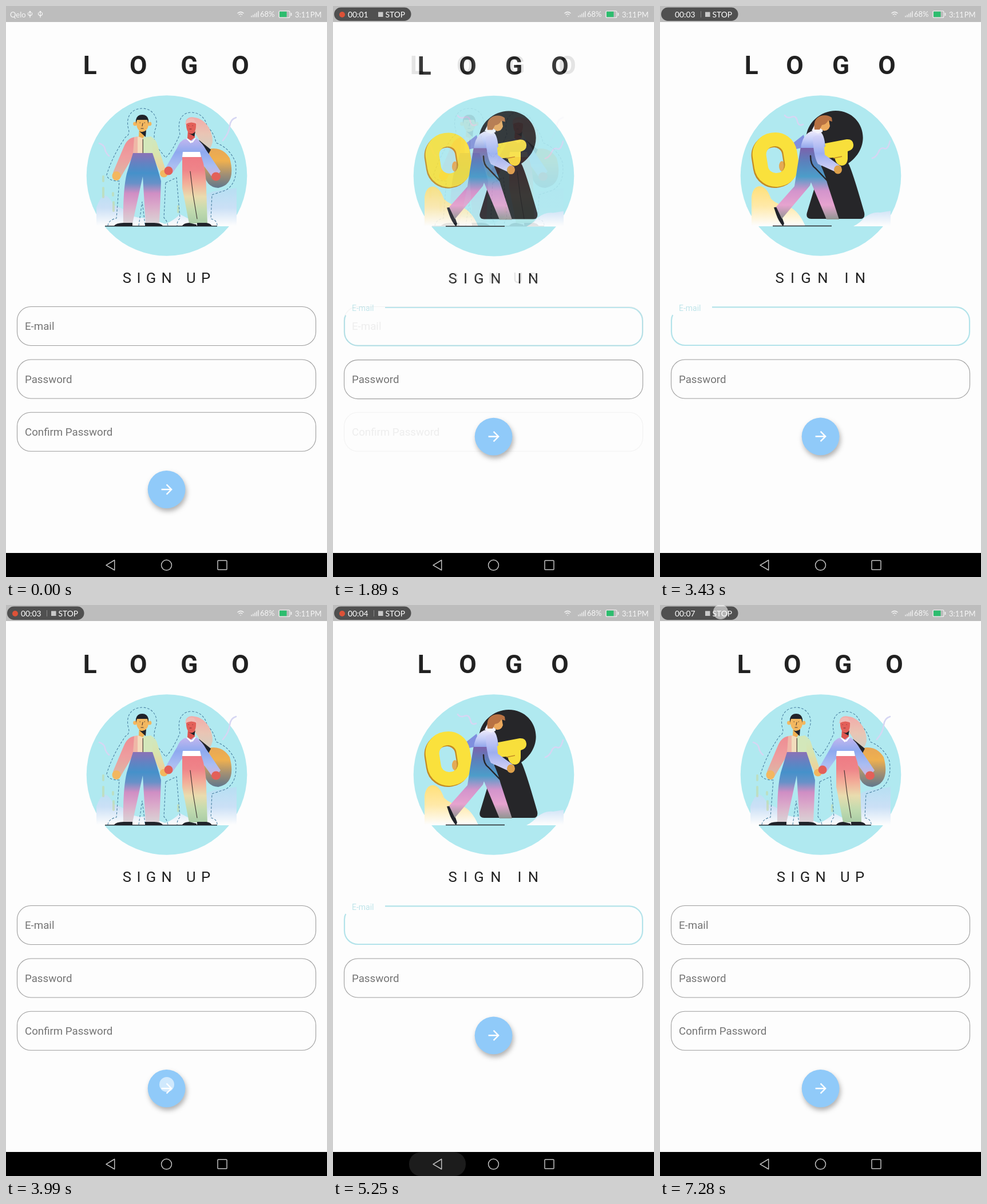
Recreate the animation shown at these times as an HTML page. Size 561 px wide and 998 px high, loop 7.35 s.

```html
<!DOCTYPE html>
<html lang="en">
<head>
<meta charset="utf-8">
<title>Sign up and sign in</title>
<style>
  html, body { margin: 0; width: 100%; height: 100%; overflow: hidden; background: #fdfdfd; }
  svg { display: block; }
  text { font-family: Roboto, sans-serif; white-space: pre; }
  .logo { font-size: 44.2px; font-weight: 700; fill: #212121; }
  .title { font-size: 25.7px; fill: #212121; }
  .label { font-size: 18.7px; fill: #747474; }
  .box { fill: none; stroke: #9c9c9c; stroke-width: 1.1; }
  .bar text { font-family: Lato, sans-serif; font-size: 13px; fill: #f6f6f6; word-spacing: -2.5px; }
  .pill text { font-size: 13.8px; fill: #fff; }
  .line { fill: none; stroke-linecap: round; stroke-linejoin: round; }
  .dash { fill: none; stroke: #4b82a3; stroke-width: 1.1; stroke-dasharray: 4 2.6; }
  #fab { filter: drop-shadow(2px 5px 4px rgba(0, 0, 0, .3)); }
</style>
</head>
<body>
<svg width="561" height="998" viewBox="0 0 561 998">
  <defs id="defs"></defs>

  <g id="signUp">
    <rect width="561" height="998" fill="#fdfdfd"/>
    <text class="logo" x="134.7" y="119" letter-spacing="58.8">LOGO</text>
    <circle cx="281" cy="296.5" r="140.3" fill="#b0e9f0"/>
    <!-- scenery -->
    <path d="M158 385V352Q166 331 173 331Q181 333 188 348Q204 352 213 362Q226 372 244 370Q262 374 278 381Q292 376 304 364L345 385Z" fill="url(#mist)"/>
    <path d="M345 385V332L362 324L403 318V385Z" fill="url(#mist)"/>
    <g class="line" stroke="#c5d9a6" stroke-width="4" opacity=".6">
      <path d="M170 298V306M170 318V334M187 327V331M188 343V358M301 350V360"/>
    </g>
    <g class="line" stroke="#d6d6f3" stroke-width="2.6">
      <path d="M163 240Q172 243 173 250T180 262M379 235Q390 222 391 210T402 195"/>
    </g>
    <g class="dash">
      <path d="M178 384Q179 374 193 371L198 306Q178 306 176 295Q186 262 209 229Q217 225 214 215C208 192 221 179 238 179C256 179 267 195 262 212Q256 228 262 244L279 265Q291 254 304 224C298 198 309 186 324 186C340 186 350 199 351 210Q364 222 367 239Q391 248 401 273Q406 309 384 322L360 330L358 372Q369 374 369 384"/>
      <path d="M232 384L238 342L243 382M279 309L276 370Q282 376 283 384M279 309L298 300L304 371Q299 375 299 384"/>
    </g>
    <!-- man -->
    <path d="M225 229Q212 231 206 246L187 291L200 300L222 263Z" fill="url(#sleeve)"/>
    <path d="M251 228Q262 231 265 244L279 286L270 291L254 260Z" fill="url(#mint)"/>
    <path d="M224 229L239 227V259H222Z" fill="#efb7a7"/>
    <path d="M230 228L239 231V258H230Z" fill="#f2dcbc"/>
    <path d="M239 230L254 228L257 259H239Z" fill="#d3e7ba"/>
    <path d="M233 212H244V225L239 231L232 228Z" fill="#f0b052"/>
    <path d="M233 219Q239 222 245 217L244 229Z" fill="#20232a"/>
    <g fill="#f3b75f">
      <circle cx="225.5" cy="206" r="3.4"/><circle cx="251" cy="206" r="3.4"/>
      <path d="M228 198H249V207Q248 219 238 219Q229 218 228 207Z"/>
      <ellipse cx="193" cy="297" rx="7.5" ry="8"/><ellipse cx="276" cy="293" rx="7" ry="6.5"/>
    </g>
    <path d="M227 206V199Q229 190 238 190Q247 190 249 199V206L247 199H229Z" fill="#20232a"/>
    <path class="line" d="M234 204h.5M242 204h.5M239 205L238 210M236 214H240M239.3 233V257" stroke="#4a3a33" stroke-width="1.2"/>
    <path d="M222 257H256Q265 283 271 306L268 380H244L239 298L221 380H205Q204 322 211 293Z" fill="url(#jeans)"/>
    <!-- woman -->
    <path d="M354 250Q378 245 391 266Q403 312 371 318Q348 317 345 286Z" fill="url(#bag)"/>
    <path d="M314 202Q317 192 330 195C348 197 362 218 361 238Q358 251 350 254L333 226Z" fill="url(#hair)"/>
    <path d="M337 234L358 251L354 259L343 250Z" fill="#20232a"/>
    <path d="M314 232Q304 235 299 248L279 283L290 293L309 267Z" fill="url(#sweater)"/>
    <path d="M333 232Q343 239 350 252L375 289L363 303L339 270Z" fill="url(#sweater)"/>
    <path d="M311 233L335 232L340 260H309Z" fill="url(#sweater)"/>
    <path d="M316 232L323 239L331 231L326 238Z" fill="#fff" stroke="#fff" stroke-width="1.4"/>
    <path d="M318 218H330V230L323 235L317 231Z" fill="#dd5650"/>
    <path d="M319 222Q326 226 331 219L329 228Z" fill="#20232a"/>
    <g fill="#e36059">
      <path d="M315 203Q324 200 332 205Q333 223 323 223Q314 221 315 203Z"/>
      <ellipse cx="284" cy="288" rx="7.5" ry="7.5"/><ellipse cx="367" cy="298" rx="8" ry="7.5"/>
    </g>
    <path d="M313 207Q315 194 328 197L335 207Q324 200 313 207Z" fill="#f1b9b4"/>
    <path class="line" d="M319 209h.4M326 209h.4M321 215H324" stroke="#7a3034" stroke-width="1.1"/>
    <path d="M308 262H341Q350 287 350 318L352 380H320L308 318Z" fill="url(#slacks)"/>
    <path d="M309 255H339L341 264H308Z" fill="#fff"/>
    <path class="line" d="M322 289L327 330L334 372" stroke="#3b3330" stroke-width="1.1"/>
    <!-- shoes and ground -->
    <g fill="#20232a">
      <path d="M188 385Q192 379 205 379H221V385ZM243 379H259Q271 379 275 385H243ZM307 385Q311 379 320 379L333 382V385ZM334 385V379H350Q358 380 360 385Z"/>
      <rect x="173" y="384" width="196" height="1.4"/>
    </g>
    <text class="title" x="203.8" y="484" letter-spacing="9.35">SIGN UP</text>
    <g id="upFields"></g>
  </g>

  <g id="signIn">
    <rect width="561" height="998" fill="#fdfdfd"/>
    <text class="logo" x="147.7" y="119" letter-spacing="50.1">LOGO</text>
    <circle cx="281" cy="296.5" r="140.3" fill="#b0e9f0"/>
    <path d="M160 385V333Q163 314 176 315Q187 317 194 337Q205 348 224 350Q243 358 254 385Z" fill="url(#dune)"/>
    <path d="M338 385Q350 379 357 370Q371 359 385 361L403 358V385Z" fill="url(#mist)"/>
    <path d="M283 275C228 236 266 183 307 183C354 183 375 243 329 275Q335 284 357 361Q359 372 350 372H264Q254 371 257 361Z" fill="#262629"/>
    <g class="line" stroke="#d6d6f3" stroke-width="2.6">
      <path d="M218 191Q222 197 230 194T240 201T250 207M371 266Q378 264 382 255T392 249T402 236"/>
    </g>
    <rect x="197" y="383.7" width="103" height="1.5" fill="#262629"/>
    <!-- key -->
    <path d="M232 240L251 225L256 246L238 250Z" fill="#7f8fdf"/>
    <ellipse cx="213" cy="280" rx="5" ry="9" fill="#e4aa55"/>
    <g fill="none" stroke-width="24">
      <rect x="173" y="235" width="54" height="71" rx="26" transform="rotate(-9 200 270)" stroke="#c48b24"/>
      <rect x="175" y="233" width="54" height="71" rx="26" transform="rotate(-9 202 268)" stroke="#fae13c"/>
    </g>
    <path d="M284 241L326 233Q337 232 338 242Q339 251 328 254V267Q327 279 317 279Q308 278 305 265L286 266Z" fill="#f8df3b"/>
    <path d="M303 266L318 263" stroke="#c48b24" stroke-width="1.6"/>
    <!-- person -->
    <path d="M199 352L207 351L212 366L217 380L215 385Q207 376 203 364Z" fill="#20232a"/>
    <path d="M246 246H270Q271 290 262 314L213 372L203 351L235 315Q240 280 246 246Z" fill="url(#denim)"/>
    <path d="M257 262L271 259Q287 287 293 312L313 373H291L263 306Z" fill="url(#denim)"/>
    <path d="M263 262Q263 278 272 284L292 305" class="line" stroke="#262629" stroke-width="2.5"/>
    <path d="M264 219Q249 225 246 248H273L289 246Q287 223 279 219Z" fill="url(#blouse)"/>
    <path d="M267 229Q280 221 286 234L288 260L317 281L309 291L276 276Q268 262 267 229Z" fill="url(#arm)"/>
    <ellipse cx="311" cy="286" rx="7" ry="7.5" fill="#dda04a"/>
    <path d="M270 208H286L284 220L276 223L265 218Z" fill="#f3f2fb"/>
    <path d="M277 199L295 199L297 210Q294 219 286 218L278 212Z" fill="#eba95d"/>
    <path d="M270 216Q267 197 281 192Q292 189 300 195L301 202L294 200Q291 207 283 208L279 216Z" fill="#b87243"/>
    <text class="title" x="201.5" y="484" letter-spacing="11.3">SIGN IN</text>
    <path d="M91 526.4H517.5a23.5 23.5 0 0 1 23.5 23.5V569.5a23.5 23.5 0 0 1-23.5 23.5H43.5a23.5 23.5 0 0 1-23.5-23.5V549q0-5 2.3-9" fill="none" stroke="#b3e3ea" stroke-width="2.2"/>
    <text x="33" y="532.5" font-size="14" fill="#bfe5ea">E-mail</text>
    <rect id="caret" x="33" y="550.5" width="1.8" height="17.5" fill="#4a86bd"/>
    <g id="inFields"></g>
  </g>

  <g id="fab">
    <circle r="32.9" fill="#90caf9"/>
    <path d="M-9 0H8M0 -8.6L8.6 0L0 8.6" fill="none" stroke="#fff" stroke-width="2.4"/>
  </g>

  <g class="bar">
    <rect width="561" height="28" fill="#bdbdbd"/>
    <g id="carrier">
      <text x="7" y="19.5">Qelo</text>
      <g class="line" stroke="#f6f6f6" stroke-width="1.1">
        <path id="usb" d="M42 20V9.5M40 11.5L42 9L44 11.5M38.5 12V15L42 17.5L45.5 15V12"/>
        <use href="#usb" x="18"/>
      </g>
    </g>
    <g class="line" stroke="#f6f6f6" stroke-width="1.3">
      <path d="M405 12.5Q410 8.5 415 12.5M407.2 15Q410 12.8 412.8 15M409.9 18h.2"/>
      <path d="M429 19V17.5M432 19V16M435 19V14M438 19V12M441 19V9.5"/>
    </g>
    <text x="444" y="18.5">68%</text>
    <rect x="477" y="8.7" width="19" height="11.6" rx="2" fill="none" stroke="#f6f6f6" stroke-width="1.1"/>
    <path d="M498.5 12V17" stroke="#f6f6f6" stroke-width="1.6"/>
    <rect x="478" y="9.7" width="12.5" height="9.6" fill="#2dbd6e"/>
    <text x="505" y="19.5">3:11 PM</text>
    <g class="pill" id="pill">
      <rect x="2" y="2.5" width="134.5" height="23.5" rx="11.75" fill="#505050"/>
      <circle id="rec" cx="16" cy="15" r="5" fill="#dd5238"/>
      <text id="clock" x="26" y="20">00:00</text>
      <rect id="split" x="71" y="9" width="1" height="11" fill="#8a8a8a"/>
      <rect x="79" y="10.5" width="8.5" height="8.5" fill="#c9c9c9"/>
      <text x="91.5" y="20">STOP</text>
    </g>
  </g>

  <rect y="956" width="561" height="42"/>
  <rect id="ripple" x="133" y="956.5" width="99" height="41.5" rx="20" fill="#fff"/>
  <g class="line" stroke="#c2c2c2" stroke-width="1.5">
    <path d="M175 977.3L189.7 968.5V986Z"/>
    <circle cx="280.5" cy="977.3" r="9"/>
    <rect x="370" y="969.3" width="16" height="16" rx="1"/>
  </g>
  <circle id="touch" r="13" fill="#fff" fill-opacity=".58"/>
</svg>

<script>
const LOOP = 7350, STEP = 70, SLIDE = 300;
const $ = id => document.getElementById(id);

// vertical gradients: top, bottom, colours evenly spread
const grads = {
  mist: [322, 384, '#b9dff3', '#cbe0f6', '#fdfdfd'],
  sleeve: [230, 298, '#ee8d92', '#ee9d9f', '#dcb7a4'],
  mint: [230, 290, '#cfe8c0', '#d9e3ad', '#f0cf98'],
  jeans: [257, 380, '#8b72b6', '#6482c2', '#4591ca', '#6791c8', '#d08ec4', '#d9a3c9', '#dbbccd', '#d9d3d7'],
  bag: [247, 318, '#e7a656', '#efb04f', '#a18f74', '#60778c'],
  hair: [194, 254, '#f3aaa8', '#e9c5b4', '#cfd0c4'],
  sweater: [232, 302, '#c3b6ee', '#8ea9ef', '#a9bdf2', '#d8b4d6'],
  slacks: [263, 380, '#ee7b84', '#ef8489', '#f2ae99', '#e9dcae', '#c2dbaf', '#a9cca6'],
  dune: [315, 384, '#ffe07a', '#ffe9a8', '#fdfdfd'],
  denim: [248, 373, '#7b62ac', '#5a82bd', '#4c9dc9', '#d394cc', '#e6a3cf', '#8f9490'],
  blouse: [219, 249, '#ece8fb', '#c3cdf8', '#8ea2ea'],
  arm: [226, 290, '#d5d4f8', '#9daef0', '#d9d5f6']
};
$('defs').innerHTML = Object.entries(grads).map(([id, [y1, y2, ...cols]]) =>
  `<linearGradient id="${id}" gradientUnits="userSpaceOnUse" x1="0" x2="0" y1="${y1}" y2="${y2}">` +
  cols.map((c, i) => `<stop offset="${i / (cols.length - 1)}" stop-color="${c}"/>`).join('') +
  '</linearGradient>').join('');

const field = (label, y) =>
  `<rect class="box" x="19.5" y="${y}" width="522" height="68" rx="24"/>` +
  `<text class="label" x="33" y="${y + 40.5}">${label}</text>`;
$('upFields').innerHTML = field('E-mail', 525.5) + field('Password', 618) + field('Confirm Password', 710.3);
$('inFields').innerHTML = field('Password', 618);

const clamp = x => Math.min(1, Math.max(0, x));

function bezier(x1, y1, x2, y2) {
  const at = (a, b, s) => 3 * (1 - s) * s * ((1 - s) * a + s * b) + s ** 3;
  return x => {
    let lo = 0, hi = 1;
    for (let i = 0; i < 24; i++) {
      const mid = (lo + hi) / 2;
      if (at(x1, x2, mid) < x) lo = mid; else hi = mid;
    }
    return at(y1, y2, (lo + hi) / 2);
  };
}
const slide = bezier(.4, 0, .2, 1), fade = bezier(.42, 0, 1, 1);

// [start, direction] of each page change
const moves = [[1610, 1], [3570, -1], [4060, 1], [6028, -1]];
// [from, to, x, y]
const taps = [[1470, 1610, 281, 838], [3920, 4060, 281, 838], [7210, 7350, 106, 12]];
const backs = [2700, 5150];

const show = (id, on) => $(id).setAttribute('visibility', on ? 'visible' : 'hidden');

function render(t) {
  const v = moves.reduce((sum, [at, dir]) => sum + dir * clamp((t - at) / SLIDE), 0);
  const pos = slide(clamp(v));
  show('signIn', v > 0);
  $('signIn').setAttribute('opacity', v >= 1 ? 1 : fade(clamp(v)));
  $('signIn').setAttribute('transform', `translate(0 ${239 * (1 - pos)})`);
  $('fab').setAttribute('transform', `translate(280.6 ${845 - 92.7 * pos})`);
  $('caret').setAttribute('opacity', v >= 1 && (t + 500) % 1000 < 500 ? 1 : 0);

  const run = t - 260, sec = Math.max(0, Math.floor(run / 1000));
  show('pill', run >= 0);
  show('carrier', run < 0);
  show('rec', run >= 0 && run % 1000 >= 500);
  show('split', t >= 2700 && t < 6000);
  $('clock').textContent = '00:0' + sec;

  const glow = backs.reduce((a, at) =>
    Math.max(a, clamp((t - at) / 70) * clamp((at + 350 - t) / 180)), 0);
  $('ripple').setAttribute('opacity', .11 * glow);

  const tap = taps.find(([from, to]) => t >= from && t < to);
  show('touch', tap);
  if (tap) $('touch').setAttribute('transform', `translate(${tap[2]} ${tap[3]})`);
}

const begin = performance.now();
function tick() {
  const t = (performance.now() - begin) % LOOP;
  render(Math.floor(t / STEP) * STEP);
  requestAnimationFrame(tick);
}
tick();
</script>
</body>
</html>
```
